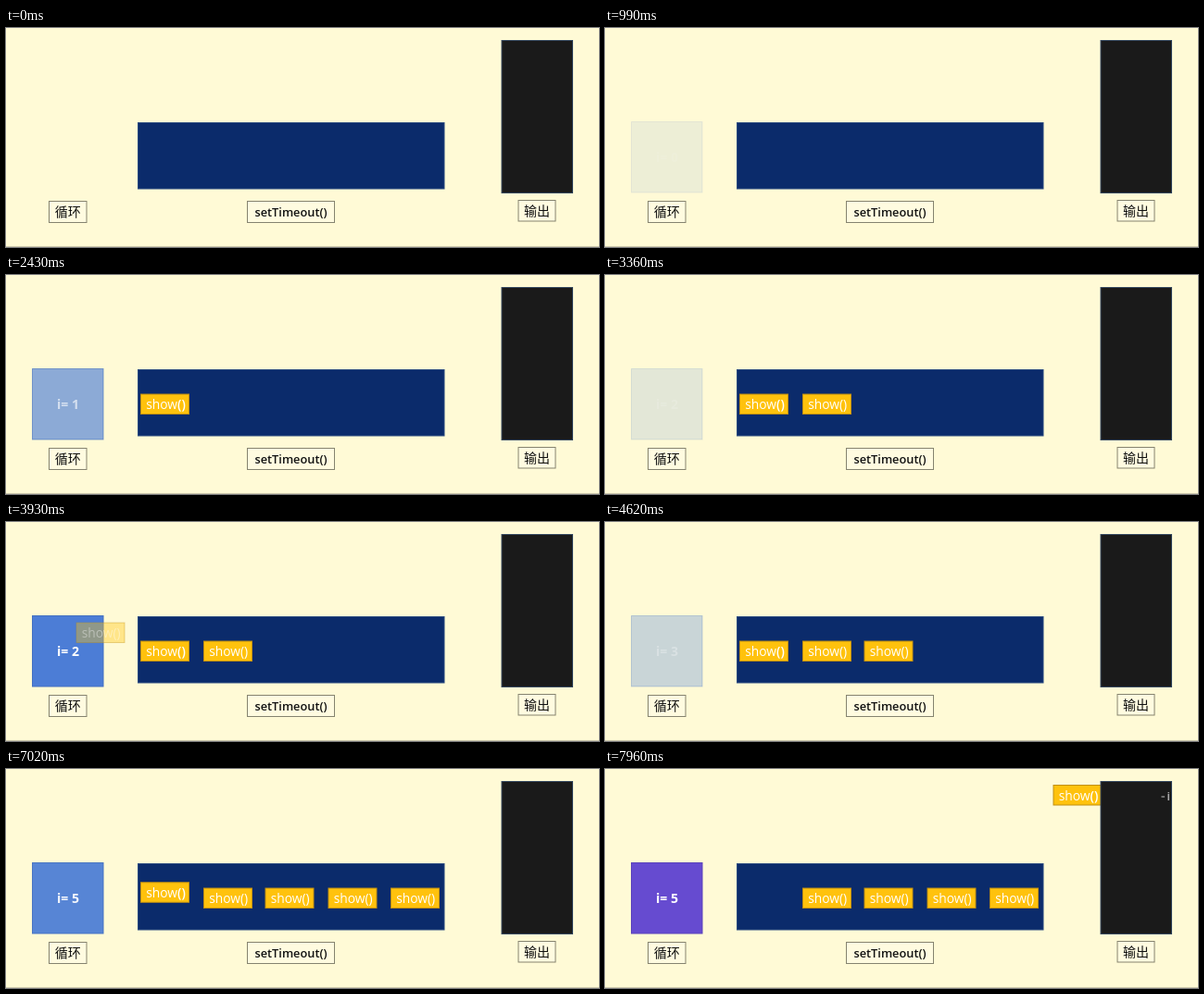
Animation of 640x237 px, one loop 8 s. Source, as an HTML page with a canvas:

```html
<!DOCTYPE html>
<html lang="zh">
<head>
<meta charset="utf-8">
<title>setTimeout() 循环</title>
<style>
html, body { margin: 0; width: 100%; height: 100%; overflow: hidden; background: #fffad6; }
canvas { display: block; width: 640px; height: 237px; }
</style>
</head>
<body>
<canvas id="stage"></canvas>
<script>
const W = 640, H = 237, LOOP = 8000;
const LATIN = '"Open Sans", "Noto Sans", sans-serif';
const CJK = '"Noto Sans CJK SC", "Noto Sans CJK", sans-serif';
const canvas = document.getElementById('stage');
const ctx = canvas.getContext('2d');
const ratio = window.devicePixelRatio || 1;
canvas.width = W * ratio;
canvas.height = H * ratio;
ctx.scale(ratio, ratio);

// The picture moves in steps; each group holds a start time and a step count.
const GROUPS = [[990, 9], [2160, 8], [3240, 8], [4350, 8], [5430, 8], [6510, 8], [7570, 4]];
const END = 8090;
const EARLY = 20;

const STARTS = [940, 2110, 3300, 4470, 5650, 6620];
const SLOTS = [145.5, 213.5, 280, 348, 415.5];
const SLOT_Y = 129;
const SPAWN = { x: 76, y: 109 };
const EXIT = { x: 484, y: 17.5 };
const BLUE = [76, 125, 214], PURPLE = [102, 75, 208];

const clamp = v => Math.max(0, Math.min(1, v));
const span = (t, a, b) => clamp((t - a) / (b - a));
const ease = p => (1 - Math.cos(Math.PI * p)) / 2;
const mix = (a, b, p) => a + (b - a) * p;

function stepTime(t) {
  for (let i = GROUPS.length - 1; i >= 0; i--) {
    const [start, count] = GROUPS[i];
    if (t < start - (i ? EARLY : 0)) continue;
    const next = i + 1 < GROUPS.length ? GROUPS[i + 1][0] : END;
    const dt = (next - start) / count;
    return start + dt * Math.floor((t - start + EARLY) / dt);
  }
  return 0;
}

function box(x, y, w, h, fill, stroke) {
  ctx.fillStyle = fill;
  ctx.fillRect(x, y, w, h);
  ctx.strokeStyle = stroke;
  ctx.lineWidth = 1;
  ctx.strokeRect(x, y, w, h);
}

function text(str, x, y, font, color, align = 'center') {
  ctx.font = font;
  ctx.fillStyle = color;
  ctx.textAlign = align;
  ctx.fillText(str, x, y);
}

function label(str, x, y, w, h, font) {
  box(x, y, w, h, '#fffbe0', '#85836f');
  text(str, x + w / 2, y + h / 2 + 5, font, '#111');
}

function showTag(x, y, heavy) {
  box(x, y, 52, 21.5, '#ffc20d', '#c08f12');
  const font = '13.8px ' + LATIN;
  const left = x + 5.7, base = y + 16;
  text('show', left, base, font, '#fff', 'left');
  const w = ctx.measureText('show').width;
  text('()', left + w, base, (heavy ? '600 ' : '') + font, '#fff', 'left');
}

function square(i, t) {
  const last = i === STARTS.length - 1;
  const start = STARTS[i], next = STARTS[i + 1];
  let alpha = span(t, start, start + (last ? 450 : 500));
  if (!last) alpha *= 1 - span(t, next - 170, next - 10);
  if (!alpha) return;
  const p = last ? span(t, 7570, 7830) : 0;
  const rgb = BLUE.map((c, k) => Math.round(mix(c, PURPLE[k], p)));
  ctx.globalAlpha = alpha;
  box(28.5, 101.5, 76.5, 76.5, `rgb(${rgb})`, `rgb(${rgb.map(c => Math.round(c * 0.9))})`);
  text('i= ' + i, 67, 145, '700 14px ' + LATIN, '#fff');
  ctx.globalAlpha = 1;
}

function tag(i, t) {
  const land = STARTS[i + 1] - 150, go = land - 360;
  const alpha = span(t, go - 110, go + 110);
  if (!alpha) return;
  const p = ease(span(t, go, land));
  let x = mix(SPAWN.x, SLOTS[i], p);
  let y = mix(SPAWN.y, SLOT_Y, p);
  if (i === 0) {
    x = mix(x, EXIT.x, ease(span(t, 7430, 7900)));
    y = mix(y, EXIT.y, ease(span(t, 6970, 7430)));
  }
  ctx.globalAlpha = alpha;
  showTag(x, y, i === 0);
  ctx.globalAlpha = 1;
}

function output(t) {
  box(535, 13.5, 76.5, 165, '#1a1a1a', '#34475f');
  if (t < 7950) return;
  text('=', 600, 32, '8px ' + LATIN, '#ccc', 'left');
  text('i', 606.5, 34, '13px ' + LATIN, '#eee', 'left');
}

function draw(t) {
  ctx.fillStyle = '#fffad6';
  ctx.fillRect(0, 0, W, H);
  ctx.fillStyle = '#cfcaae';
  ctx.fillRect(0, 236, W, 1);
  box(142.5, 102.5, 330.5, 71.5, '#0b2b6b', '#2b4a80');
  label('循环', 46.5, 187.5, 40.5, 23, '500 14px ' + CJK);
  label('setTimeout()', 260.5, 187.5, 94, 23, '600 12.8px ' + LATIN);
  label('输出', 553, 186.5, 40, 22.5, '500 14px ' + CJK);
  STARTS.forEach((_, i) => square(i, t));
  for (let i = SLOTS.length - 1; i >= 0; i--) tag(i, t);
  output(t);
}

function frame(now) {
  draw(stepTime(now % LOOP));
  requestAnimationFrame(frame);
}

draw(0);
requestAnimationFrame(frame);
</script>
</body>
</html>
```
